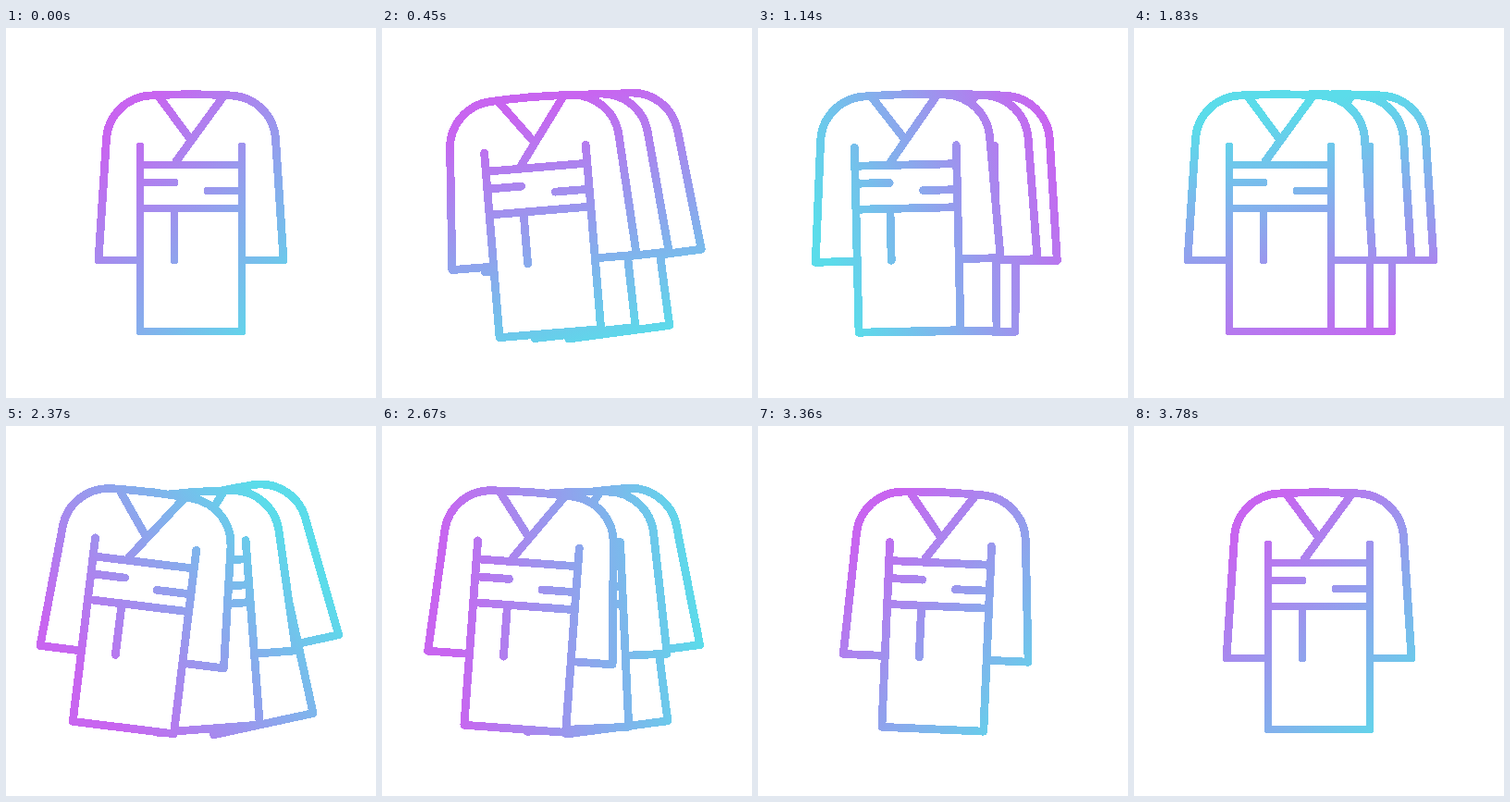
An HTML page that plays this animation: 400x400 px, repeating every 3840 ms.

```html
<!DOCTYPE html>
<html lang="en">
<head>
<meta charset="utf-8">
<title>Kimono</title>
<style>
  html, body { margin: 0; width: 100%; height: 100%; overflow: hidden; background: #fff; }
  svg { display: block; width: 100vw; height: 100vh; }
</style>
</head>
<body>
<svg id="stage" viewBox="0 0 400 400" shape-rendering="crispEdges"></svg>
<script>
const LOOP = 3840, STEP = 30, LAST = 3780, BEAT = 540;
const PIVOT = '200 72';
const CENTER = { x: 209, y: 217 }, REACH = 136;
const NS = 'http://www.w3.org/2000/svg';
const stage = document.getElementById('stage');

const SHOULDERS = 'L100 251L108.500 120C110 95 130 74.500 156 73Q200 70.500 244 73C270 74.500 290 95 291.500 120L300 251';
const OUTLINE = 'M145 251' + SHOULDERS + 'H255V328H145Z';
const LINES = [
  'M145 251' + SHOULDERS + 'H255',
  'M145 128V328H255V128',
  'M145 148H255M145 195H255',
  'M145 167H182M218 176H255M182 195V251',
  'M165 74L200 121M235 74L184 144',
  'M200 71h.01'
].join('');

// Back to front: resting offset, sideways nudge on the way, start delay, fan angle.
const garments = [
  { rest: 24, nudge: 0, lag: 150, fan: -14 },
  { rest: 0, nudge: -18, lag: 105, fan: -5 },
  { rest: -42, nudge: 0, lag: 60, fan: 8 }
];

const progress = (t, start, length) => Math.min(1, Math.max(0, (t - start) / length));
const ease = u => (1 - Math.cos(Math.PI * u)) / 2;
const bump = u => Math.sin(Math.PI * u);

// Pendulum that dies out after the given number of half swings.
function swing(t, start, halves, half) {
  const u = progress(t, start, halves * half);
  return -10 * Math.sin(Math.PI * halves * u) * (1 - u);
}

function pose(g, t) {
  const spread = progress(t, 0, BEAT);
  const apart = ease(spread) - ease(progress(t, 2580, 420));
  return {
    dx: g.rest * apart + g.nudge * bump(spread),
    dy: 3 * bump(progress(t, 0, 900)),
    turn: swing(t, g.lag, 3, 500) + g.fan * bump(progress(t, 2160, 620)) + swing(t, 5 * BEAT, 2, BEAT)
  };
}

function add(parent, tag, attrs) {
  const el = document.createElementNS(NS, tag);
  for (const k in attrs) el.setAttribute(k, attrs[k]);
  return parent.appendChild(el);
}

garments.forEach((g, i) => {
  g.paint = add(stage, 'linearGradient', { id: 'paint' + i, gradientUnits: 'userSpaceOnUse' });
  add(g.paint, 'stop', { offset: 0, 'stop-color': '#c865f0' });
  add(g.paint, 'stop', { offset: 1, 'stop-color': '#5bdcea' });
  g.el = add(stage, 'g', {});
  add(g.el, 'path', { d: OUTLINE, fill: '#fff' });
  add(g.el, 'path', {
    d: LINES, fill: 'none', stroke: `url(#paint${i})`, 'stroke-width': 8.8,
    'stroke-linecap': 'round', 'stroke-linejoin': 'round'
  });
});

function render(t) {
  // The colours make one full turn per loop.
  const a = Math.PI * (0.25 + 2 * ease((t / LAST) ** 0.8));
  const x = REACH * Math.cos(a), y = REACH * Math.sin(a);
  const ends = { x1: CENTER.x - x, y1: CENTER.y - y, x2: CENTER.x + x, y2: CENTER.y + y };
  for (const g of garments) {
    const { dx, dy, turn } = pose(g, t);
    g.el.setAttribute('transform', `translate(${dx} ${dy}) rotate(${turn} ${PIVOT})`);
    // Undo the garment's motion so the colours stay fixed to the stage.
    g.paint.setAttribute('gradientTransform', `rotate(${-turn} ${PIVOT}) translate(${-dx} ${-dy})`);
    for (const k in ends) g.paint.setAttribute(k, ends[k]);
  }
}

const start = performance.now();
function tick() {
  const t = (performance.now() - start) % LOOP;
  render(Math.min(LAST, Math.floor(t / STEP) * STEP));
  requestAnimationFrame(tick);
}
tick();
</script>
</body>
</html>
```
